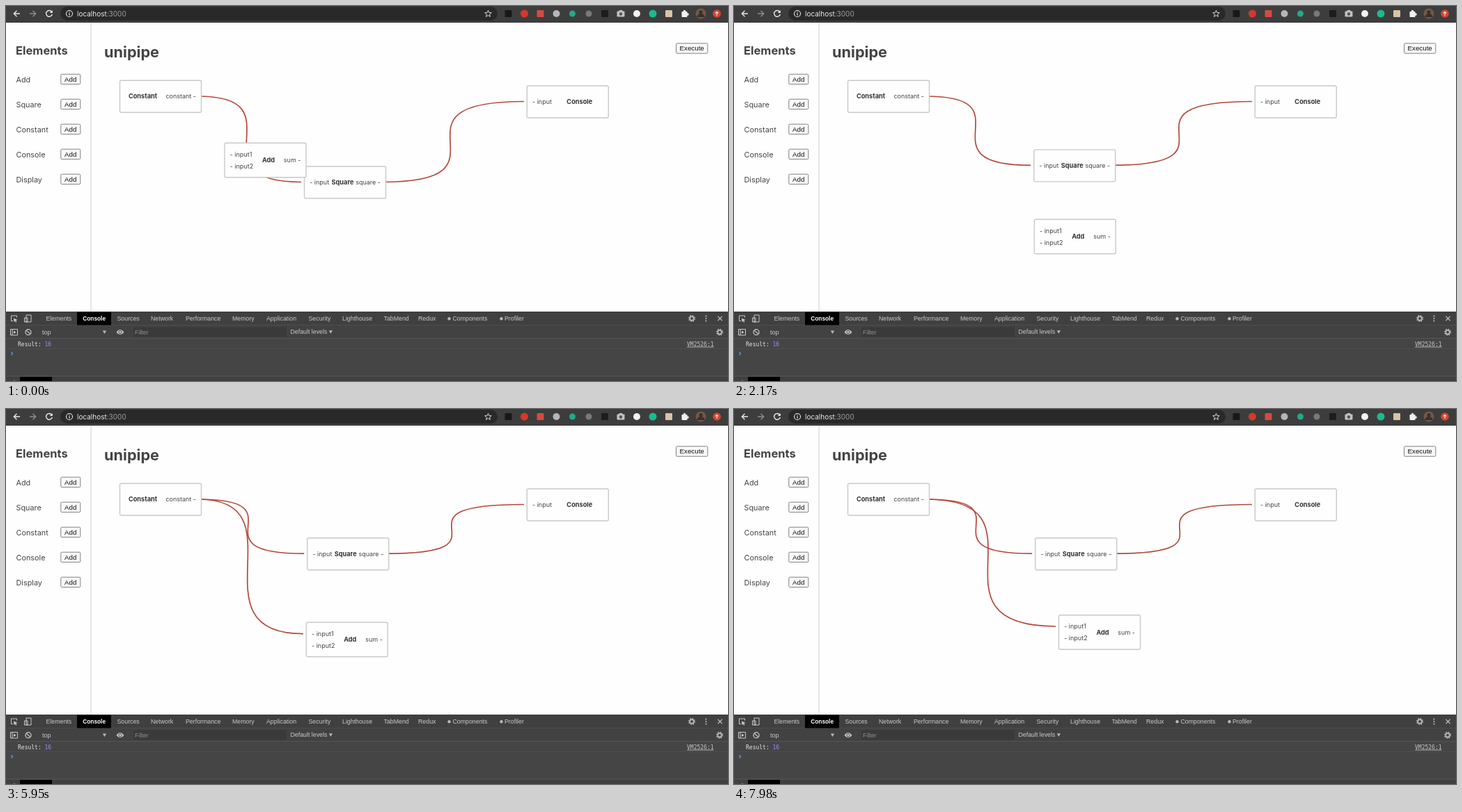
An HTML page that plays this animation: 1037x540 px, repeating every 8000 ms.

```html
<!DOCTYPE html>
<html lang="en">
<head>
<meta charset="utf-8">
<title>Node editor</title>
<style>
html, body { margin: 0; width: 100%; height: 100%; overflow: hidden; background: #fefefe; }
svg { display: block; width: 100%; height: 100%; }
text { white-space: pre; }
.ui { font-family: Inter, "Open Sans", sans-serif; fill: #444; }
.bold { font-weight: 700; fill: #333; }
.sys { font-family: "Liberation Sans", Arial, sans-serif; }
.mono { font-family: "DejaVu Sans Mono", monospace; font-size: 8px; }
.link { fill: none; stroke: #b24a3c; stroke-width: 1.7; }
</style>
</head>
<body>
<svg id="stage" viewBox="0 0 1037 540"></svg>
<script>
const NS = "http://www.w3.org/2000/svg";
const stage = document.getElementById("stage");

function el(tag, attrs, parent = stage) {
  const node = document.createElementNS(NS, tag);
  for (const key in attrs) node.setAttribute(key, attrs[key]);
  parent.appendChild(node);
  return node;
}
const rect = (x, y, width, height, fill, more = {}, parent) =>
  el("rect", { x, y, width, height, fill, ...more }, parent);
const circle = (cx, cy, r, fill, more = {}) => el("circle", { cx, cy, r, fill, ...more });
const stroke = (d, color, width = 1.2) =>
  el("path", { d, fill: "none", stroke: color, "stroke-width": width });
const solid = (d, fill) => el("path", { d, fill });
function label(str, x, y, size, cls, more = {}, parent) {
  const node = el("text", { x, y, "font-size": size, class: cls, ...more }, parent);
  node.textContent = str;
  return node;
}

function gear(x, y, color) {
  circle(x, y, 2.8, "none", { stroke: color, "stroke-width": 1.8 });
  circle(x, y, 4.3, "none", { stroke: color, "stroke-width": 1.5, "stroke-dasharray": "1.7 1.68" });
}

function drawBrowserBar() {
  const light = "#e8eaed";
  rect(0, 0, 1037, 24, "#3d3d3d");
  rect(78, 1, 628, 20, "#292929", { rx: 10 });
  stroke("M20 11H11.5M15.5 6.8L11.3 11L15.5 15.2", light, 1.4);
  stroke("M34 11H42.5M38.5 6.8L42.7 11L38.5 15.2", "#8d8e90", 1.4);
  stroke("M65.6 8.3A4.4 4.4 0 1 0 66.3 12", light, 1.4);
  solid("M66.8 6V10H62.8Z", light);
  circle(91, 11, 4.5, "none", { stroke: light, "stroke-width": 1.1 });
  stroke("M91 10.3V13.6M91 8.2V9.3", light);
  const url = label("localhost", 102, 14.6, 10, "ui", { style: "fill:#e8eaed" });
  const port = el("tspan", { style: "fill:#9aa0a6" }, url);
  port.textContent = ":3000";

  let star = "";
  for (let i = 0; i < 10; i++) {
    const r = i % 2 ? 2.2 : 5, a = -Math.PI / 2 + i * Math.PI / 5;
    star += (i ? "L" : "M") + (692.5 + r * Math.cos(a)) + " " + (11.3 + r * Math.sin(a));
  }
  stroke(star + "Z", "#d8dadd", 1);

  const square = (x, fill) => rect(x - 5, 6, 10, 10, fill, { rx: 1 });
  square(721.5, "#17181a");
  circle(744.5, 11, 5.5, "#d5382c");
  square(767.5, "#d34b42");
  circle(790.5, 11, 5, "#b5b6b8");
  circle(813.5, 11, 4.5, "#23a98a");
  circle(837, 11, 4.5, "#77797c");
  square(860, "#1c1d1f");
  rect(877.5, 7.5, 11, 8, "#c0c2c4", { rx: 1 });
  rect(880.5, 6, 5, 2, "#c0c2c4");
  circle(883, 11.5, 2.2, "#505257");
  circle(906, 11, 5, "#f2f2f2");
  circle(929, 11, 5.5, "#1cba91");
  square(952, "#d9c3a4");
  rect(970.5, 8, 8, 8, "#f1f1f1", { rx: 1 });
  circle(974.5, 7.5, 1.8, "#f1f1f1");
  circle(979, 12, 1.8, "#f1f1f1");
  circle(998, 11, 7.5, "#725846");
  circle(998, 8.8, 2.6, "#39302a");
  solid("M992.5 16A5.5 5 0 0 1 1003.5 16Z", "#39302a");
  circle(1021, 11, 5.8, "#d74432");
  stroke("M1021 14V8.5M1018.8 10.5L1021 8.3L1023.2 10.5", "#f5d9d3");
}

function button(str, x, y, width, height) {
  rect(x, y, width, height, "#f9f9f9", { rx: 1.5, stroke: "#808080" });
  label(str, x + width / 2, y + height / 2 + 3.4, 9.75, "sys", { "text-anchor": "middle", fill: "#111" });
}

function drawPage() {
  rect(0, 24, 1037, 416, "#fefefe");
  rect(121.5, 24, 1.3, 416, "#d9d9d9");
  label("Elements", 14, 69.7, 16.5, "ui bold", { style: "fill:#444" });
  label("unipipe", 141, 73.5, 21.7, "ui bold", { style: "fill:#444" });
  ["Add", "Square", "Constant", "Console", "Display"].forEach((name, i) => {
    label(name, 14.5, 110 + i * 36, 10.85, "ui");
    button("Add", 78.8, 98.2 + i * 36, 28, 14.4);
  });
  button("Execute", 962.5, 53.8, 45.3, 14.4);
}

function drawDevtools() {
  const grey = "#c8c9ca", dim = "#b8b9ba";
  rect(0, 440, 1037, 100, "#454545");
  rect(0, 440, 1037, 19.5, "#404040");
  rect(0, 459.5, 1037, 19, "#424242");
  rect(0, 459, 1037, 1, "#4d4d4d");
  rect(0, 478, 1037, 1, "#555");
  rect(102, 440.5, 49, 19, "#000");
  rect(183, 462.5, 220, 14, "#3a3a3a");
  rect(0, 493, 1037, 1, "#4e4e4e");
  rect(0, 533, 1037, 7, "#404040");
  rect(0, 532.5, 1037, 1, "#585858");
  rect(20, 534, 46, 6, "#000");
  circle(12, 540, 0.9, "#aaa");

  stroke("M10 453.5H7.5V446H15.5V448.5", grey, 1);
  solid("M11 449.5L16.5 452L14.2 453L15.5 455L14 455.5L13 453.6L11.5 455Z", grey);
  stroke("M29 445H36V455H29ZM26.5 449H31V455H26.5Z", grey, 1);

  const tabs = [["Elements", 57.5], ["Sources", 159.5], ["Network", 208], ["Performance", 258],
    ["Memory", 325], ["Application", 374], ["Security", 434.5], ["Lighthouse", 483],
    ["TabMend", 542.5], ["Redux", 592], ["Components", 641.5], ["Profiler", 716]];
  for (const [name, x] of tabs) label(name, x, 453, 8.8, "sys", { fill: grey });
  label("Console", 110.3, 453, 8.3, "sys", { fill: "#fff", "font-weight": 700 });
  circle(636.5, 450.2, 2.2, dim);
  circle(711.5, 450.2, 2.2, dim);
  gear(985, 450, dim);
  for (const y of [446.5, 450, 453.5]) circle(1005.5, y, 1, grey);
  stroke("M1022.3 446.8L1028.7 453.2M1028.7 446.8L1022.3 453.2", grey);

  stroke("M6.5 465.5H16.5V474H6.5ZM9 465.5V474", grey, 1);
  solid("M11 467.5L14.5 469.8L11 472Z", grey);
  circle(32, 469.7, 4, "none", { stroke: grey, "stroke-width": 1.3 });
  stroke("M29.2 466.9L34.8 472.5", grey);
  label("top", 52, 472.6, 9, "sys", { fill: grey });
  solid("M138.8 467.5H144.2L141.5 472Z", dim);
  solid("M158.5 469.7Q164 462.5 169.5 469.7Q164 477 158.5 469.7Z", grey);
  circle(164, 469.7, 2.1, grey, { stroke: "#424242", "stroke-width": 1 });
  label("Filter", 185, 472.8, 8.9, "sys", { fill: "#8d8e8f" });
  label("Default levels", 408.5, 472.4, 8.8, "sys", { fill: grey });
  solid("M463.8 467.3H469L466.4 471.7Z", dim);
  gear(1025, 469.7, dim);

  const line = label("Result: ", 17, 489.7, 8, "mono", { fill: "#e4e4e4" });
  const value = el("tspan", { fill: "#a08cf5" }, line);
  value.textContent = "16";
  label("VM2526:1", 978, 489.7, 8, "mono", { fill: "#c4c4c4", "text-decoration": "underline" });
  stroke("M7.2 498.2L9.8 500.5L7.2 502.8", "#5391e6", 1.3);
}

const nodeSize = { width: 117, low: 46, tall: 49.5 };

function makeNode(title, titleX, inputs, output, tall) {
  const g = el("g", {});
  const height = tall ? nodeSize.tall : nodeSize.low;
  rect(0, 0, nodeSize.width, height, "#fefefe", { rx: 2, stroke: "#c9c9c9", "stroke-width": 1.4 }, g);
  const mid = height / 2;
  const hover = output && rect(61.7, 14.7, 51, 16.6, "#f39b8b", { rx: 1.5, visibility: "hidden" }, g);
  inputs.forEach((name, i) => {
    const y = mid + 3.2 + (i - (inputs.length - 1) / 2) * 16.6;
    label("- " + name, 7.7, y, 9, "ui", {}, g);
  });
  label(title, titleX, mid + 3.3, 9.2, "ui bold", { "text-anchor": "middle" }, g);
  const out = output && label(output + " -", 109.5, mid + 3.2, 9, "ui", { "text-anchor": "end" }, g);
  return {
    place([x, y]) { g.setAttribute("transform", `translate(${x} ${y})`); },
    highlight(on) {
      hover.setAttribute("visibility", on ? "visible" : "hidden");
      out.style.fill = on ? "#fff" : "";
    }
  };
}

// Handles span the full width, so the curve is upright in the middle.
function route([x1, y1], [x2, y2]) {
  const headRoom = 12;
  return `M${x1} ${y1}C${x2} ${y1} ${x1 - headRoom} ${y2} ${x2} ${y2}`;
}

// Each key: time, x, y
const addKeys = [[0, 314, 197.3], [250, 329, 231], [650, 385, 300], [900, 415, 307], [1120, 431.3, 307.3],
  [6160, 431.3, 307.3], [6860, 387.5, 302.3], [7910, 466.5, 296.7]];
const squareKeys = [[1610, 428.5, 231], [2660, 432.7, 185.7]];

function along(keys, t) {
  if (t <= keys[0][0]) return keys[0].slice(1);
  for (let i = 1; i < keys.length; i++) {
    const [ta, xa, ya] = keys[i - 1], [tb, xb, yb] = keys[i];
    if (t < tb) {
      const p = (t - ta) / (tb - ta);
      return [xa + (xb - xa) * p, ya + (yb - ya) * p];
    }
  }
  return keys[keys.length - 1].slice(1);
}

drawPage();
const links = [0, 1, 2].map(() => el("path", { class: "link" }));
const constantNode = makeNode("Constant", 33, [], "constant");
const consoleNode = makeNode("Console", 75.5, ["input"], "");
const squareNode = makeNode("Square", 55, ["input"], "square");
const addNode = makeNode("Add", 63, ["input1", "input2"], "sum", true);
drawBrowserBar();
drawDevtools();
constantNode.place([163.5, 107.2]);
consoleNode.place([748.3, 115]);

const LOOP = 8000, STEP = 70;
const source = [276, 130], sink = [744, 137.5];

function render(time) {
  const t = Math.floor((time % LOOP) / STEP) * STEP;
  const add = along(addKeys, t);
  const [sx, sy] = along(squareKeys, t);
  addNode.place(add);
  squareNode.place([sx, sy]);
  constantNode.highlight(t >= 4690 && t < 5250);
  links[0].setAttribute("d", route(source, [sx - 4.5, sy + 22.5]));
  links[1].setAttribute("d", route([sx + 112.5, sy + 22.5], sink));
  links[2].setAttribute("d", route(source, [add[0] - 4.3, add[1] + 16.3]));
  links[2].setAttribute("visibility", t >= 5600 ? "visible" : "hidden");
}

const start = performance.now();
function tick() {
  render(performance.now() - start);
  requestAnimationFrame(tick);
}
tick();
</script>
</body>
</html>
```
